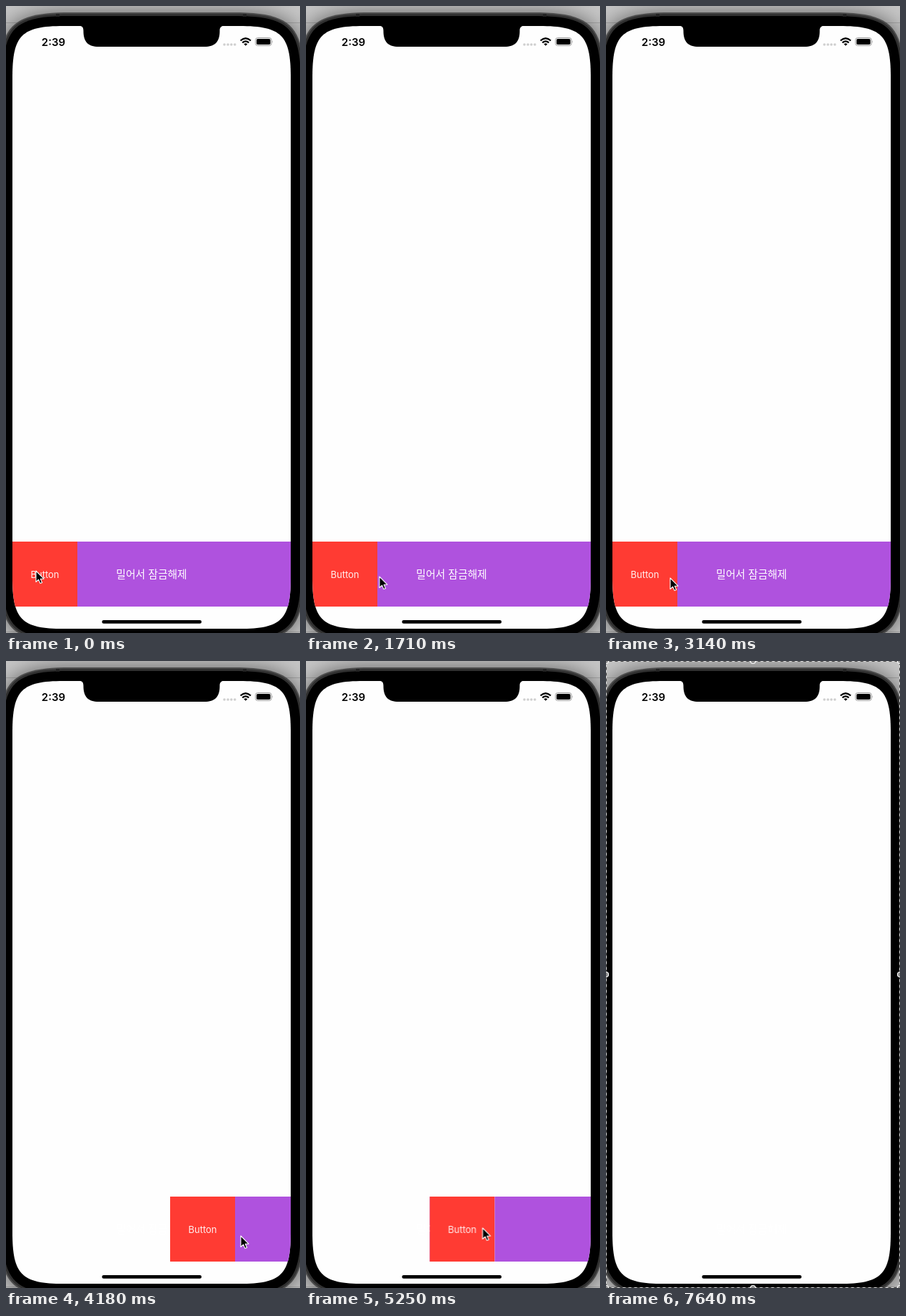
Animation of 412 by 878 pixels, one loop 8.35 s. Source, as an HTML page:

```html
<!DOCTYPE html>
<html lang="ko">
<head>
<meta charset="utf-8">
<title>Slide to unlock</title>
<style>
  html, body { margin: 0; width: 100%; height: 100%; overflow: hidden; background: #bdbdbd; }
  svg { display: block; width: 412px; height: 878px; }
  text { text-anchor: middle; }
  .clock { font: 600 15px Inter, sans-serif; }
  .hint { font: 400 14.8px "Noto Sans CJK KR", "Noto Sans CJK", sans-serif; fill: #fff; }
  .label { font: 400 13px Inter, sans-serif; fill: #fff; fill-opacity: .92; }

  .slide { animation: slide 8350ms infinite; }
  .pointer { animation: point 8350ms infinite, leave 8350ms step-end infinite; }
  .selection { animation: select 8350ms step-end infinite; }

  /* drag right, release, spring home; the last drag unlocks */
  @keyframes slide {
    0% { transform: translateX(0); animation-timing-function: ease-in-out; }
    8.144%, 11.617% { transform: translateX(177px); animation-timing-function: ease-in-out; }
    15.569%, 22.754% { transform: translateX(0); animation-timing-function: ease-in-out; }
    25.629%, 27.066% { transform: translateX(169px); animation-timing-function: ease-in-out; }
    31.018%, 37.605% { transform: translateX(0); animation-timing-function: ease-in-out; }
    44.072%, 45.749% { transform: translateX(109px); animation-timing-function: ease-in-out; }
    50.06%, 53.653% { transform: translateX(221px); animation-timing-function: ease-in-out; }
    57.485%, 60.838% { transform: translateX(0); animation-timing-function: ease-in; }
    62.874% { transform: translateX(164px); animation-timing-function: ease-out; }
    66.946% { transform: translateX(256px); animation-timing-function: ease-in-out; }
    70.539%, 100% { transform: translateX(392px); }
  }
  @keyframes point {
    0% { transform: translate(42px, 791px); animation-timing-function: ease-in-out; }
    8.144%, 11.976% { transform: translate(229px, 796px); animation-timing-function: ease-in-out; }
    20.479% { transform: translate(103px, 799px); animation-timing-function: ease-out; }
    21.796%, 22.754% { transform: translate(92px, 800px); animation-timing-function: ease-in-out; }
    25.629%, 27.425% { transform: translate(267px, 803px); animation-timing-function: ease-in-out; }
    36.766%, 37.605% { transform: translate(90px, 801px); animation-timing-function: ease-in-out; }
    44.072%, 45.749% { transform: translate(219px, 804px); animation-timing-function: ease-in-out; }
    50.06%, 53.653% { transform: translate(329px, 805px); animation-timing-function: ease-in-out; }
    59.401%, 60.838% { transform: translate(66px, 796px); animation-timing-function: ease-in; }
    62.874% { transform: translate(247px, 794px); animation-timing-function: ease-out; }
    66.946% { transform: translate(336px, 780px); animation-timing-function: ease-in-out; }
    70.539%, 73.054% { transform: translate(327px, 767px); }
    73.533%, 79.281% { transform: translate(325px, 765px); animation-timing-function: linear; }
    80.36%, 100% { transform: translate(412px, 878px); }
  }
  @keyframes leave { 0% { opacity: 1; } 80.36%, 100% { opacity: 0; } }
  @keyframes select { 0% { opacity: 0; } 83.353%, 100% { opacity: 1; } }
</style>
</head>
<body>
<svg viewBox="0 0 412 878">
  <defs>
    <clipPath id="screenClip"><path id="clipShape"/></clipPath>
    <filter id="blur" x="-20%" y="-20%" width="140%" height="140%"><feGaussianBlur stdDeviation="14"/></filter>
  </defs>

  <rect width="412" height="878" fill="#c6c6c6"/>
  <path d="M0 23.5H412M0 876.5H412" stroke="#a8a8a8"/>
  <path id="shadow" filter="url(#blur)" opacity=".5"/>
  <path id="rim" fill="#4b4b4b"/>
  <path id="band" fill="#303030"/>
  <path id="body"/>
  <path d="M70 11h5v4h-5zM332 11h5v4h-5z" fill="#222"/>
  <path id="screen" fill="#fefefe"/>

  <g clip-path="url(#screenClip)">
    <rect class="slide" x="9" y="750" width="400" height="91" fill="#af52de"/>
    <text class="hint" x="204" y="801">밀어서 잠금해제</text>
    <g class="slide">
      <rect x="9" y="750" width="91" height="91" fill="#ff3b33"/>
      <text class="label" x="54.5" y="800.5">Button</text>
    </g>
  </g>

  <path d="M102 27.5C107 28 108.500 30 108.500 35C108.500 50 115 57 130 57H278C293 57 299.500 50 299.500 35C299.500 30 301 28 306 27.500Z"/>
  <text class="clock" x="66.500" y="55.500">2:39</text>
  <g fill="#cfcfcf">
    <circle cx="306" cy="54" r="1.800"/><circle cx="311" cy="54" r="1.800"/>
    <circle cx="315.800" cy="54" r="1.800"/><circle cx="320.700" cy="54" r="1.800"/>
  </g>
  <g fill="none" stroke="#000" stroke-width="2.200">
    <path d="M328.600 48.500Q335.800 42 343 48.500M331.300 51.400Q335.800 47.300 340.300 51.400"/>
    <path d="M333.300 53.200Q335.800 51.200 338.300 53.200L335.800 55.800Z" fill="#000" stroke="none"/>
  </g>
  <rect x="349.500" y="44.500" width="22.500" height="11" rx="3.200" fill="none" stroke="#999"/>
  <rect x="351" y="46" width="19.500" height="8" rx="1.800"/>
  <path d="M373.300 48.200q1.400 1.800 0 3.600z" fill="#999"/>
  <rect x="134.500" y="860" width="139.500" height="4.800" rx="2.400"/>

  <path class="pointer" d="M0 0V15.500L3.600 12.200L6 17.600L8.600 16.500L6.300 11.200H11Z" stroke="#fff" stroke-width="1.100" stroke-linejoin="round"/>

  <g class="selection">
    <rect x=".5" y=".5" width="411" height="877" fill="none" stroke="#444"/>
    <rect x=".5" y=".5" width="411" height="877" fill="none" stroke="#d8d8d8" stroke-dasharray="4 4"/>
    <g id="handles" fill="#8c8c8c" stroke="#fff" stroke-width="1.200"></g>
  </g>
</svg>
<script>
  const shape = id => document.getElementById(id);

  // Rounded rectangle with continuous-curvature corners
  function squircle(x, y, w, h, r) {
    const e = r * 1.528, c = r * .272, right = x + w, bottom = y + h;
    return `M${x} ${y + e}C${x} ${y + c} ${x + c} ${y} ${x + e} ${y}H${right - e}` +
      `C${right - c} ${y} ${right} ${y + c} ${right} ${y + e}V${bottom - e}` +
      `C${right} ${bottom - c} ${right - c} ${bottom} ${right - e} ${bottom}H${x + e}` +
      `C${x + c} ${bottom} ${x} ${bottom - c} ${x} ${bottom - e}Z`;
  }

  // Each layer is the screen outline grown by a margin
  const layers = { shadow: 19, rim: 19, band: 17, body: 14, screen: 0, clipShape: 0 };
  for (const [id, m] of Object.entries(layers))
    shape(id).setAttribute("d", squircle(9 - m, 28 - m, 390 + 2 * m, 844 + 2 * m, 47 + m));

  const spots = [0, 206, 412].flatMap(x => [0, 439, 878].map(y => [x, y]))
    .filter(([x, y]) => x !== 206 || y !== 439);
  shape("handles").innerHTML = spots.map(([x, y]) => `<circle cx="${x}" cy="${y}" r="3.500"/>`).join("");
</script>
</body>
</html>
```
